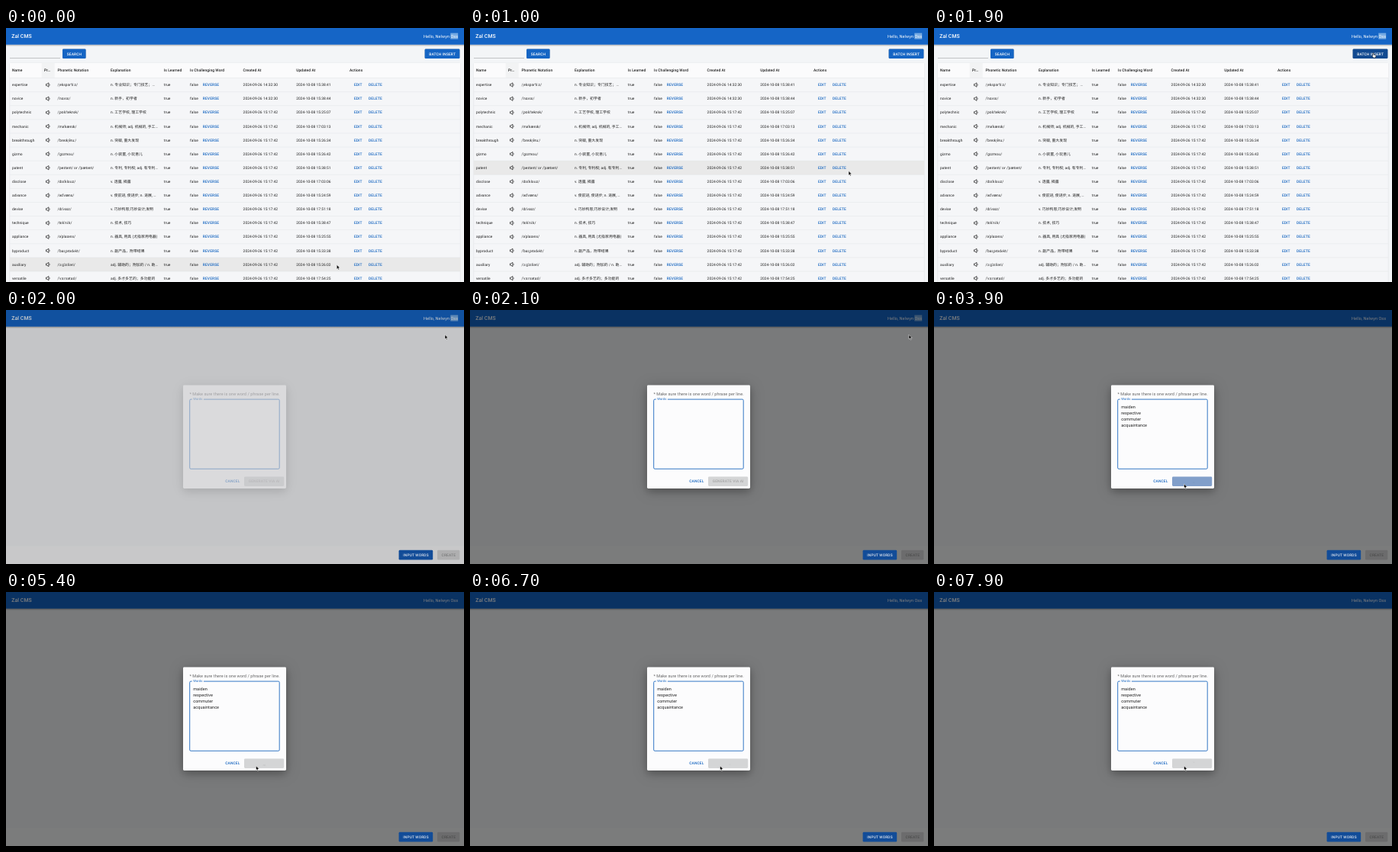
Recreate the animation shown at these times as an HTML page. Size 600x333 px, loop 8 s.

```html
<!DOCTYPE html>
<html lang="en">
<head>
<meta charset="utf-8">
<title>Word admin</title>
<style>
  html, body { margin: 0; width: 100%; height: 100%; overflow: hidden; background: #f3f5f7; }
  svg { display: block; width: 100vw; height: 100vh; }
  text {
    font: 400 4.86px Roboto, "Noto Sans CJK SC", "Noto Sans CJK", "Noto Sans", sans-serif;
    letter-spacing: .01071em; fill: #1f1f1f; text-rendering: geometricPrecision; white-space: pre;
  }
  .head { font-weight: 500; font-size: 4.95px; }
  .btn { font-weight: 500; letter-spacing: .02857em; fill: #fff; }
  .link { font-weight: 500; letter-spacing: .02857em; fill: #1565c0; }
  .mid { text-anchor: middle; }
  .big { font-size: 5.56px; letter-spacing: .00938em; }
  .blue { fill: #1565c4; }
  .shadow { filter: drop-shadow(0 .7px .7px rgba(0, 0, 0, .3)); }
  .off { fill: rgba(0, 0, 0, .12); }

  .anim { animation: 8s step-end infinite; }
  #list { animation-name: list; }
  #page { animation-name: page; }
  #dim, #dialog { animation-name: fade; }
  #pick { animation-name: pick; }
  #batch { animation-name: batch; }
  #words { animation-name: words; }
  #go { animation-name: go; }
  #goText { animation-name: goText; }
  #spin { animation-name: spin; }
  @keyframes list { 0% { visibility: visible } 25%, 100% { visibility: hidden } }
  @keyframes page { 0% { visibility: hidden } 25%, 100% { visibility: visible } }
  @keyframes fade { 0% { opacity: 0 } 25% { opacity: .39 } 26.25%, 100% { opacity: 1 } }
  @keyframes pick { 0% { opacity: 1 } 35%, 100% { opacity: 0 } }
  @keyframes batch { 0% { fill: #1565c4 } 20%, 100% { fill: #124a90 } }
  @keyframes words { 0% { opacity: 0 } 35%, 100% { opacity: 1 } }
  @keyframes go {
    0% { fill: #d4d5d6 } 35% { fill: #1565c4 } 45% { fill: #124f9c }
    47.5% { fill: #3f74b4 } 48.75% { fill: #819fca } 50%, 100% { fill: #d4d5d6 }
  }
  @keyframes goText { 0% { fill: #a6a6a6 } 35% { fill: #fff } 47.5%, 100% { fill: transparent } }
  @keyframes spin { 0% { opacity: 0 } 47.5%, 100% { opacity: 1 } }
</style>
</head>
<body>
<svg viewBox="0 0 600 333" preserveAspectRatio="none">
  <defs>
    <g id="speaker" fill="none" stroke="#222" stroke-width=".75" stroke-linejoin="round">
      <path d="M-2.5-1.1h1.3L.9-2.7V2.7L-1.2 1.1h-1.3z"/>
      <path d="M1.8-1.2q.9 1.2 0 2.4" stroke-width=".6"/>
    </g>
    <linearGradient id="barShade" x2="0" y2="1">
      <stop stop-color="#000" stop-opacity=".3"/>
      <stop offset="1" stop-color="#000" stop-opacity="0"/>
    </linearGradient>
  </defs>

  <rect width="600" height="333" fill="#f3f5f7"/>

  <g id="list" class="anim">
    <path d="M5 39.5H71" stroke="#8f9193" stroke-width=".5"/>
    <rect class="blue shadow" x="74" y="27.4" width="30.6" height="12.7" rx="1.4"/>
    <text class="btn mid" x="89.4" y="35.5">SEARCH</text>
    <rect id="batch" class="blue shadow anim" x="548.6" y="27.4" width="45.8" height="12.7" rx="1.4"/>
    <text class="btn mid" x="571.6" y="35.5">BATCH INSERT</text>
    <rect x="4.7" y="45.7" width="590.6" height="300" rx="1.4" fill="#f5f6f8" stroke="#dcdee0" stroke-width=".4"/>
    <rect x="4.9" y="45.9" width="590.2" height="19.5" fill="#fbfbfc"/>
    <rect x="46.8" y="45.9" width="17" height="19.5" fill="#f2f3f4"/>
    <rect id="hover" x="4.9" width="590.2" height="18.11" fill="#e9e9e9"/>
    <g id="table"></g>
  </g>

  <g id="page" class="anim">
    <rect y="309.3" width="600" height="23.7" fill="#f8f9fa"/>
    <rect class="off" x="565" y="314.8" width="29.4" height="12.8" rx="1.4"/>
    <text class="btn mid" x="579.8" y="322.9" style="fill:rgba(0,0,0,.3)">CREATE</text>
  </g>

  <rect y="21.8" width="600" height="2.4" fill="url(#barShade)"/>
  <rect width="600" height="21.8" fill="#1565c6"/>
  <text x="7.2" y="12.9" class="btn" style="font-size:6.94px;letter-spacing:.0075em">Zal CMS</text>
  <rect id="pick" class="anim" x="582.3" y="6.6" width="9.9" height="8" fill="#76aae2"/>
  <text class="big" x="547" y="12.6" style="fill:#fff">Hello, Nelwyn Oss</text>

  <rect id="dim" class="anim" width="600" height="333" fill="rgba(0,0,0,.5)"/>

  <g class="anim" style="animation-name:page">
    <rect x="514.6" y="314.8" width="44.6" height="12.8" rx="1.4" fill="#124c98"/>
    <text class="btn mid" x="537" y="322.9" style="fill:#dbe2ec">INPUT WORDS</text>
  </g>

  <g id="dialog" class="anim">
    <rect x="232" y="98.6" width="135" height="135.4" rx="1.4" fill="#fcfcfd"
      style="filter:drop-shadow(0 4px 5px rgba(0,0,0,.22)) drop-shadow(0 2px 9px rgba(0,0,0,.18))"/>
    <text class="big" x="240.4" y="112.1" style="fill:#646464">* Make sure there is one word / phrase per line.</text>
    <rect x="240.7" y="117.1" width="117.5" height="91.2" rx="1.4" fill="none" stroke="#1f69c0" stroke-width=".9"/>
    <rect x="243.7" y="116" width="15.2" height="2" fill="#fcfcfd"/>
    <text x="245.2" y="118.4" style="font-size:4.2px;fill:#1565c0">Words</text>
    <g id="words" class="anim"></g>
    <text class="link mid" x="296.9" y="226.3">CANCEL</text>
    <rect id="go" class="anim" x="312" y="218.4" width="52.2" height="12.6" rx="1.4"/>
    <text id="goText" class="btn mid anim" x="338.2" y="226.3">GENERATE VIA AI</text>
    <g id="spin" class="anim">
      <circle id="ring" cx="338.3" cy="224.7" r="2.55" pathLength="127" fill="none"
        stroke="#000" stroke-opacity=".26" stroke-width=".46"/>
    </g>
  </g>

  <g id="cursor">
    <path id="arrow" d="M0 0V5.7L1.3 4.5 2.2 6.6 3.2 6.2 2.3 4.1H4.1z" fill="#000" stroke="#fff" stroke-width=".5"/>
    <path id="hand" d="M0 .4Q.6-.3 1 .5V2.5L3.4 3.1Q4 3.4 3.9 4.2L3.4 6.5H.5L-1.2 3.9Q-1.1 3.1 0 3.9z"
      fill="#fff" stroke="#000" stroke-width=".5"/>
    <path id="beam" d="M-1-3H1M0-3V3M-1 3H1" fill="none" stroke="#111" stroke-width=".5"/>
  </g>
</svg>

<script>
const LOOP = 8000, TOP = 65.5, ROW = 18.11;
const $ = id => document.getElementById(id);

const heads = [[8, "Name"], [50, "Pr…"], [67.4, "Phonetic Notation"], [137, "Explanation"],
  [206.8, "Is Learned"], [241, "Is Challenging Word"], [310.6, "Created At"],
  [380.2, "Updated At"], [450, "Actions"]];

// word | phonetics | meaning | time of last update
const rows = `expertise|/ˌekspɜrˈtiːz/|n. 专业知识；专门技艺；…|15:38:41
novice|/ˈnɑvɪs/|n. 新手，初学者|15:38:44
polytechnic|/ˌpɒlɪˈteknɪk/|n. 工艺学校, 理工学校|15:25:07
mechanic|/məˈkænɪk/|n. 机械师; adj. 机械的, 手工…|17:03:13
breakthrough|/ˈbreɪkˌθruː/|n. 突破, 重大发现|15:26:34
gizmo|/ˈɡɪzmoʊ/|n. 小装置, 小玩意儿|15:26:42
patent|/ˈpeɪtənt/ or /ˈpætənt/|n. 专利, 专利权; adj. 有专利…|15:38:51
disclose|/dɪsˈkloʊz/|v. 透露, 揭露|17:03:06
advance|/ədˈvæns/|v. 使前进, 使进步; n. 进展, …|15:24:59
devise|/dɪˈvaɪz/|v. 巧妙构思;巧妙设计;发明|17:51:18
technique|/tɛkˈniːk/|n. 技术, 技巧|15:38:47
appliance|/əˈplaɪəns/|n. 器具, 用具 (尤指家用电器)|15:25:55
byproduct|/ˈbaɪˌprɒdʌkt/|n. 副产品，附带结果|15:33:38
auxiliary|/ɔːɡˈzɪliəri/|adj. 辅助的；附加的 / n. 助…|15:26:02
versatile|/ˈvɜːrsətaɪl/|adj. 多才多艺的；多功能的|17:54:25`.split("\n").map(r => r.split("|"));

const text = (x, y, s, cls = "") => `<text x="${x}" y="${y}" class="${cls}">${s}</text>`;
const line = y => `<path d="M4.9 ${y}H595.1" stroke="#dcdee0" stroke-width=".4"/>`;

$("table").innerHTML = line(TOP) + heads.map(([x, s]) => text(x, 57.2, s, "head")).join("") +
  rows.map(([word, sound, meaning, time], i) => {
    const mid = TOP + ROW * (i + .5), y = mid + 1.7;
    return line(TOP + ROW * (i + 1)) +
      `<use href="#speaker" x="55" y="${mid}"/>` +
      text(8, y, word) + text(67.4, y, sound) +
      `<g lang="zh-CN">${text(137, y, meaning)}</g>` +
      text(206.8, y, "true") + text(241, y, "false") + text(257.8, y, "REVERSE", "link") +
      text(310.6, y, "2024-09-26 " + (i < 2 ? "14:32:30" : "15:17:42")) +
      text(380.2, y, "2024-10-08 " + time) +
      text(455.9, y, "EDIT", "link") + text(475, y, "DELETE", "link");
  }).join("");

$("words").innerHTML = ["maiden", "respective", "commuter", "acquaintance"]
  .map((w, i) => text(245.2, 128.7 + 8 * i, w, "big")).join("");

// pointer stops: time, x, y
const stops = [[0, 433.3, 310.5], [400, 433.3, 310.5], [1700, 575, 32.5], [2200, 575, 32.5],
  [2600, 315, 165], [3200, 315, 165], [3600, 327.5, 228], [LOOP, 327.5, 228]];
const ease = u => u * u * (3 - 2 * u);
const within = (t, a, b) => t >= a && t < b;

function pointer(t) {
  const i = stops.findIndex(s => s[0] > t);
  const [t0, x0, y0] = stops[i - 1], [t1, x1, y1] = stops[i];
  const k = ease((t - t0) / (t1 - t0));
  return [x0 + (x1 - x0) * k, y0 + (y1 - y0) * k];
}

function drawPointer(t) {
  const [x, y] = pointer(t);
  $("cursor").setAttribute("transform", `translate(${x} ${y})`);
  const hand = within(t, 1600, 2000) || within(t, 3550, 3800);
  const beam = within(t, 2500, 3400);
  $("hand").style.display = hand ? "" : "none";
  $("beam").style.display = beam ? "" : "none";
  $("arrow").style.display = hand || beam ? "none" : "";
  const row = Math.floor((y - TOP) / ROW);
  $("hover").setAttribute("y", TOP + ROW * row);
  $("hover").style.display = row >= 0 && t < 2000 ? "" : "none";
}

function drawSpinner(t) {
  const p = Math.max(0, t - 3800) / 1400 % 1;
  const grow = ease(Math.min(1, p * 2)), slide = ease(Math.max(0, p * 2 - 1));
  const ring = $("ring");
  ring.setAttribute("stroke-dasharray", `${1 + 99 * grow} 200`);
  ring.setAttribute("stroke-dashoffset", -15 * grow - 110 * slide);
  ring.setAttribute("transform", `rotate(${360 * p} 338.3 224.7)`);
}

let start;
function frame(now) {
  start ??= now;
  const t = (now - start) % LOOP;
  drawPointer(t);
  drawSpinner(t);
  requestAnimationFrame(frame);
}
requestAnimationFrame(frame);
</script>
</body>
</html>
```
